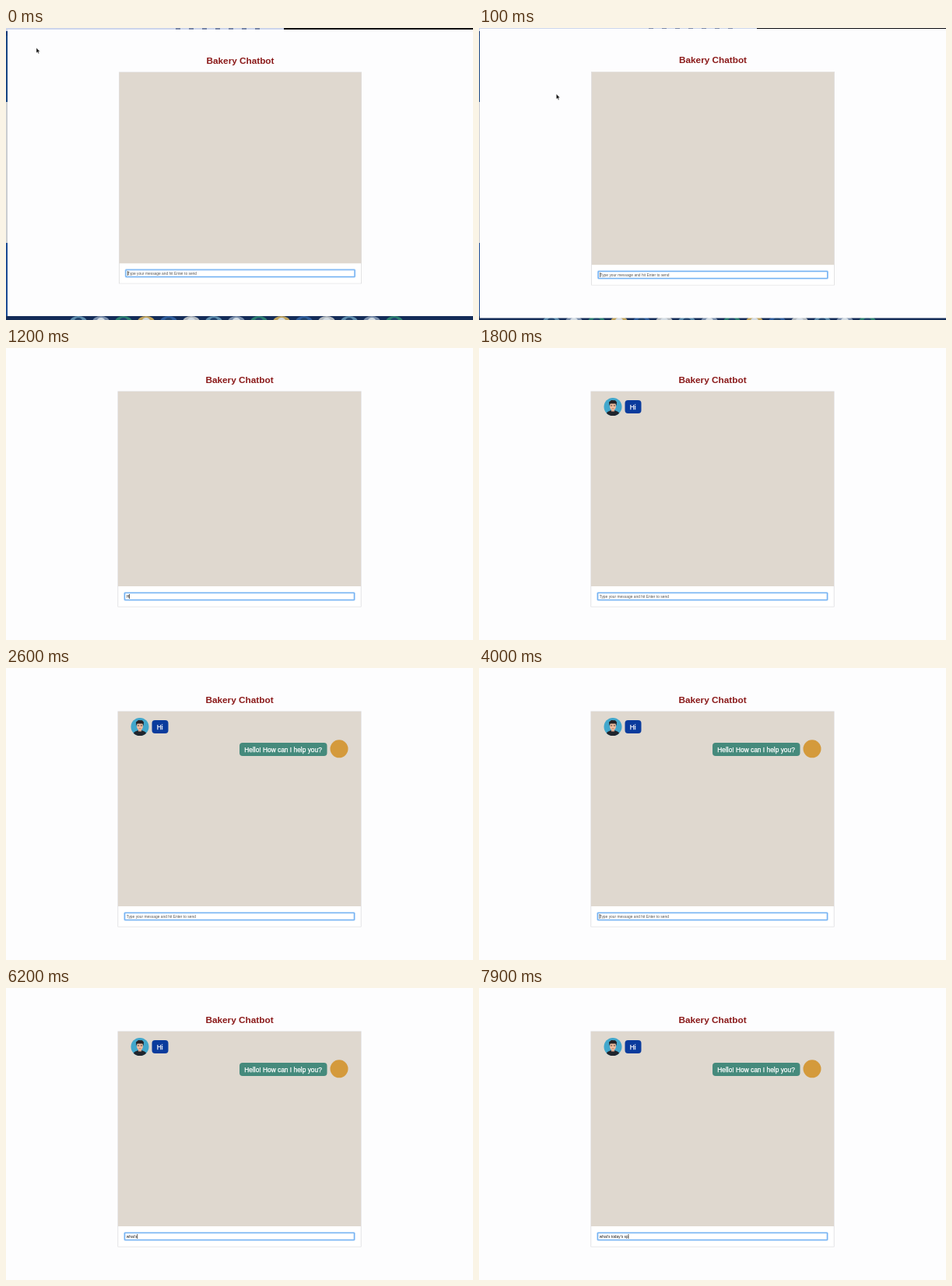
These frames come from a looping animation (600 px wide and 375 px high, 8 s). An HTML page with a canvas:

```html
<!DOCTYPE html>
<html lang="en">
<head>
<meta charset="utf-8">
<title>Bakery Chatbot</title>
<style>
html, body { margin: 0; width: 100%; height: 100%; overflow: hidden; background: #fdfdfe; }
canvas { display: block; width: 600px; height: 375px; }
</style>
</head>
<body>
<canvas id="stage" width="600" height="375"></canvas>
<script>
const ctx = document.getElementById('stage').getContext('2d');
const SANS = '"Liberation Sans", Arial, sans-serif';
const LOOP = 8000, STEP = 100;
const FIRST_KEY = 1000, USER_SENT = 1700, BOT_REPLIED = 2000;
const HINT = 'Type your message and hit Enter to send';
const DRAFTS = [
  { text: 'Hi', keys: [1000, 1300], end: USER_SENT },
  { text: "what's today's sp", end: LOOP,
    keys: [5000, 5200, 5400, 5700, 5900, 6100, 6400, 6600, 6700,
           6800, 6900, 7000, 7200, 7300, 7500, 7600, 7800] }
];

const clamp = v => Math.max(0, Math.min(1, v));

function rect(x, y, w, h, color) {
  ctx.fillStyle = color;
  ctx.fillRect(x, y, w, h);
}

function roundRect(x, y, w, h, r, color) {
  ctx.fillStyle = color;
  ctx.beginPath();
  ctx.roundRect(x, y, w, h, r);
  ctx.fill();
}

function ellipse(x, y, rx, ry, color) {
  ctx.fillStyle = color;
  ctx.beginPath();
  ctx.ellipse(x, y, rx, ry, 0, 0, Math.PI * 2);
  ctx.fill();
}

function polygon(points, color) {
  ctx.fillStyle = color;
  ctx.beginPath();
  points.forEach(([x, y]) => ctx.lineTo(x, y));
  ctx.closePath();
  ctx.fill();
}

function label(text, x, y, font, color, align = 'left') {
  ctx.font = `${font} ${SANS}`;
  ctx.textAlign = align;
  ctx.fillStyle = color;
  ctx.fillText(text, x, y);
}

function desktop() {
  rect(0, 0, 600, 375, '#153a76');
  rect(0, 0, 357, 4, '#ccd5ec');
  rect(357, 0, 243, 4, '#08080c');
  rect(0, 10, 4, 85, '#174582');
  rect(0, 95, 4, 181, '#cbcdd0');
  rect(0, 276, 4, 94, '#1c4b94');
  for (let i = 0; i < 7; i++) rect(218 + i * 17, 0, 6, 2, '#7987a8');
  rect(0, 370, 600, 5, '#142c58');
  const dock = ['#5f8eae', '#b4bac0', '#315f9e', '#c0a35d', '#2d8170', '#7b8fac'];
  for (let i = 0; i < 15; i++) {
    ellipse(93 + i * 29, 377, 11, 7, dock[i * 5 % 6]);
    ellipse(93 + i * 29, 376, 5, 4, i % 2 ? '#d3dce4' : '#23456e');
  }
}

function userAvatar(x, y) {
  ctx.save();
  ctx.beginPath();
  ctx.arc(x, y, 11.5, 0, Math.PI * 2);
  ctx.clip();
  rect(x - 12, y - 12, 24, 24, '#42a7cc');
  ellipse(x, y + 11.5, 9.5, 7, '#20252d');
  rect(x - 2, y + 1, 4, 5, '#d9a489');
  ellipse(x, y - 1, 4, 5.4, '#efbd9f');
  polygon([[x - 4.6, y - 1], [x - 5, y - 6], [x - 2, y - 8.4], [x + 3, y - 8.3],
           [x + 5, y - 6], [x + 4.6, y - 1], [x + 3.5, y - 4], [x - 3.5, y - 4]], '#252126');
  rect(x - 3.2, y - 2, 2.4, 1, '#493a38');
  rect(x + 0.8, y - 2, 2.4, 1, '#493a38');
  rect(x - 1.4, y + 2, 2.8, 0.7, '#a95f55');
  ctx.restore();
}

function bubble(text, x, y, w, color) {
  roundRect(x, y, w, 17, 4, color);
  label(text, x + 6.2, y + 11.6, '8.4px', '#fff');
  ctx.strokeStyle = '#fff';
  ctx.lineWidth = 0.25;
  ctx.strokeText(text, x + 6.2, y + 11.6);
}

function inputField(t) {
  roundRect(151.2, 313.2, 297.6, 11.6, 2, '#b5d7fa');
  roundRect(152, 314, 296, 10, 1, '#75b2f2');
  rect(153.3, 315.2, 293.4, 7.6, '#fff');
  const draft = DRAFTS.find(d => t >= d.keys[0] && t < d.end);
  const typed = draft ? draft.text.slice(0, draft.keys.filter(k => t >= k).length) : '';
  label(typed || HINT, 154.7, 320.8, '4.9px', typed ? '#161616' : '#555');
  if (typed || t % 1000 < 600) {
    const caretX = 154.7 + (typed ? ctx.measureText(typed).width : 0);
    rect(caretX, 316, 0.7, 6, '#222');
  }
}

function page(t) {
  rect(0, 0, 600, 375, '#fdfdfe');
  label('Bakery Chatbot', 300, 44.6, 'bold 11.8px', '#8b1a1a', 'center');
  rect(143.5, 55.5, 313, 277, '#d8d8da');
  rect(144.2, 56, 311.6, 276, '#fff');
  rect(144, 56, 312, 250, '#dfd8cf');
  if (t >= USER_SENT) {
    userAvatar(172, 75.5);
    bubble('Hi', 187.5, 67, 21, '#0a3b9d');
  }
  if (t >= BOT_REPLIED) {
    bubble('Hello! How can I help you?', 300, 96, 112.5, '#458a7c');
    ellipse(428, 103.8, 11.5, 11.5, '#d49a3c');
  }
  inputField(t);
}

function dockShadow(alpha) {
  const fade = ctx.createLinearGradient(0, 365, 0, 375);
  fade.addColorStop(0, 'rgba(120,120,125,0)');
  fade.addColorStop(1, `rgba(120,120,125,${0.4 * alpha})`);
  ctx.fillStyle = fade;
  ctx.beginPath();
  ctx.roundRect(74, 365, 450, 12, 8);
  ctx.fill();
}

function pointer(t) {
  const p = clamp(t / 300);
  ctx.save();
  ctx.translate(39 + 181 * p, 25.5 + 178 * p);
  const arrow = [[0, 0], [0, 6.5], [1.5, 5.2], [2.6, 7.6], [3.6, 7.1], [2.6, 4.8], [4.6, 4.7]];
  polygon(arrow, '#111');
  ctx.strokeStyle = 'rgba(255,255,255,.75)';
  ctx.lineWidth = 0.5;
  ctx.stroke();
  ctx.restore();
}

function draw(t) {
  const inset = 1 - clamp(t / 200);
  if (inset > 0) desktop();
  ctx.save();
  ctx.translate(2 * inset, 2 * inset);
  ctx.scale(1 - inset * 2 / 600, 1 - inset * 7 / 375);
  page(t);
  ctx.restore();
  if (t >= 200 && t < 700) dockShadow(clamp((700 - t) / 400));
  if (t < FIRST_KEY) pointer(t);
}

const start = performance.now();
function tick() {
  const t = (performance.now() - start) % LOOP;
  draw(Math.floor(t / STEP) * STEP);
  requestAnimationFrame(tick);
}
tick();
</script>
</body>
</html>
```
